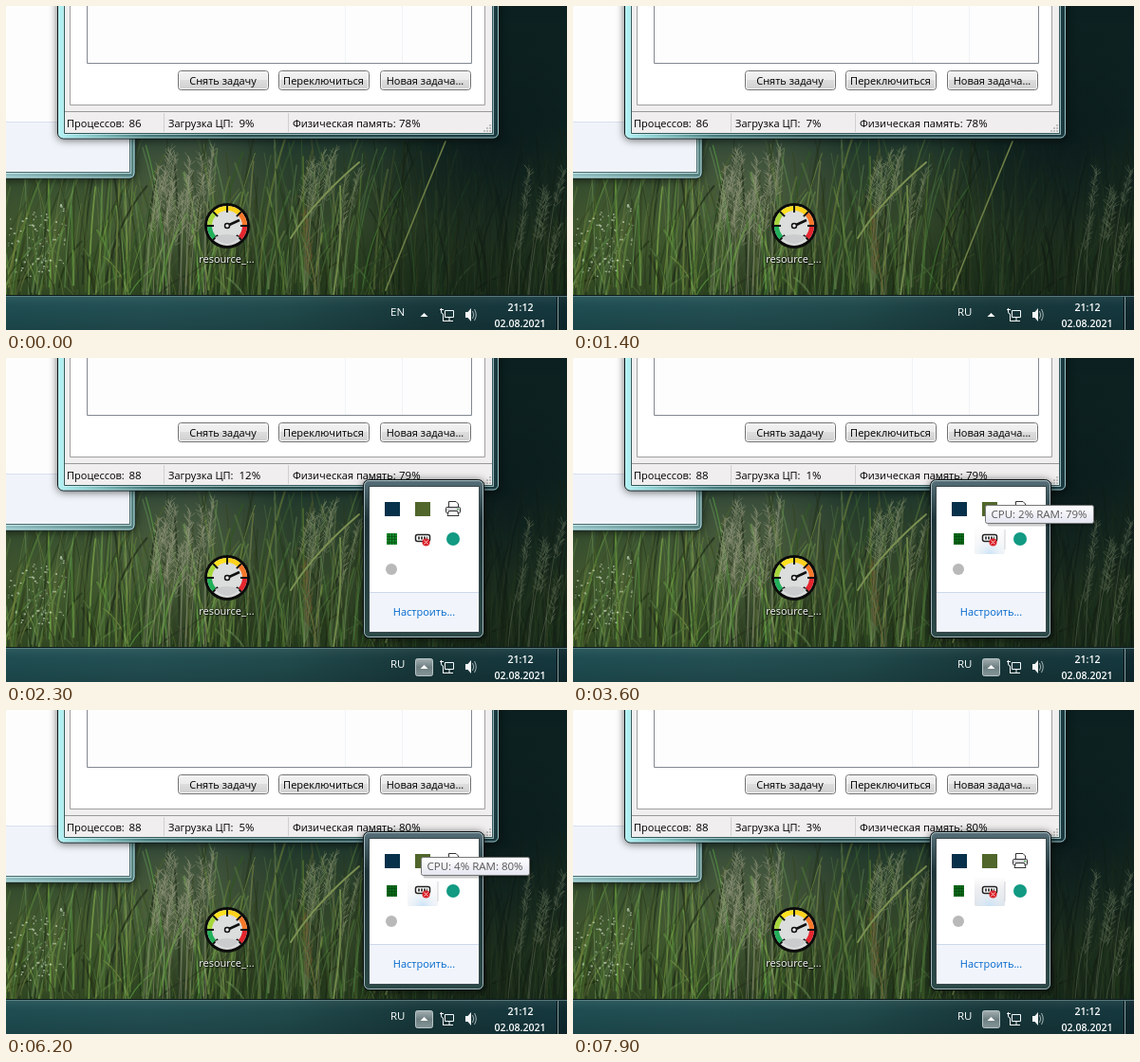
Recreate the animation shown at these times as an HTML page with a canvas. Size 591 px wide and 342 px high, loop 8 s.

```html
<!DOCTYPE html>
<html lang="ru">
<head>
<meta charset="utf-8">
<title>Tray monitor</title>
<style>
html, body { margin: 0; width: 100%; height: 100%; overflow: hidden; background: #0c1b1e; }
canvas, svg { position: absolute; left: 0; top: 0; width: 591px; height: 342px; display: block; }
text { font: 11px "Open Sans", "Noto Sans", sans-serif; }
.mid { text-anchor: middle; }
.value, .tray text, #tipText { font-size: 11.5px; }
.tray text { fill: #fff; }
.tray .clock { font-size: 10.6px; font-weight: 600; }
.label { fill: #fff; text-shadow: 1px 1px 2px #000, 0 0 2px #000; }
.shadow { filter: drop-shadow(0 1px 4px rgba(0, 0, 0, .6)); }
</style>
</head>
<body>
<canvas id="meadow" width="591" height="342"></canvas>
<svg viewBox="0 0 591 342">
  <defs>
    <linearGradient id="glass">
      <stop offset="0" stop-color="#b4f4f6"/><stop offset=".04" stop-color="#9adbdd"/>
      <stop offset=".2" stop-color="#4a7c7c"/><stop offset=".4" stop-color="#2c514f"/>
      <stop offset="1" stop-color="#1b3a40"/>
    </linearGradient>
    <linearGradient id="backGlass">
      <stop offset="0" stop-color="#9fcdd0"/><stop offset="1" stop-color="#55807f"/>
    </linearGradient>
    <linearGradient id="button" x2="0" y2="1">
      <stop offset="0" stop-color="#f3f3f3"/><stop offset=".49" stop-color="#ebebeb"/>
      <stop offset=".5" stop-color="#dddddd"/><stop offset="1" stop-color="#cfcfcf"/>
    </linearGradient>
    <linearGradient id="bar">
      <stop offset="0" stop-color="#1f5054"/><stop offset=".25" stop-color="#245256"/>
      <stop offset=".5" stop-color="#224d4f"/><stop offset=".75" stop-color="#18393c"/>
      <stop offset="1" stop-color="#153a41"/>
    </linearGradient>
    <linearGradient id="barShade" x2="0" y2="1">
      <stop offset="0" stop-color="#fff" stop-opacity=".08"/><stop offset=".35" stop-color="#000" stop-opacity=".04"/>
      <stop offset="1" stop-color="#000" stop-opacity=".16"/>
    </linearGradient>
    <linearGradient id="popupGlass" x2="0" y2="1">
      <stop offset="0" stop-color="#57707a"/><stop offset=".25" stop-color="#1e3338"/>
      <stop offset="1" stop-color="#2c4a48"/>
    </linearGradient>
    <linearGradient id="tipFill" x2="0" y2="1">
      <stop offset="0" stop-color="#fff"/><stop offset="1" stop-color="#e4e5f0"/>
    </linearGradient>
    <linearGradient id="cellFill" x2="0" y2="1">
      <stop offset="0" stop-color="#fff"/><stop offset=".45" stop-color="#ecedf0"/>
      <stop offset="1" stop-color="#d7dbe2"/>
    </linearGradient>
    <radialGradient id="cellGlow" cy="1" r=".7">
      <stop offset="0" stop-color="#c9e2f6"/><stop offset="1" stop-color="#fff" stop-opacity="0"/>
    </radialGradient>
    <linearGradient id="arrowFill" x2="0" y2="1">
      <stop offset="0" stop-color="#a3b0b2"/><stop offset=".5" stop-color="#6e7f82"/>
      <stop offset="1" stop-color="#859699"/>
    </linearGradient>
  </defs>

  <g class="shadow">
    <rect x="-20" y="-20" width="156" height="202" rx="6" fill="url(#backGlass)" stroke="#16282b"/>
    <path d="M0 181H130Q135 181 135 176V0" fill="none" stroke="#c9f1f2" stroke-opacity=".85"/>
  </g>
  <path d="M0 176.500H131.500V0" fill="none" stroke="#d5f3f4" stroke-opacity=".7"/>
  <path d="M-2 -2H130.500V175.500H-2Z" fill="#f0f4fa" stroke="#48696c"/>
  <path d="M0 0H130V122H0Z" fill="#fdfdfd"/>
  <path d="M0 122.500H130" stroke="#d9e2ee"/>

  <g class="shadow">
    <rect x="54.500" y="-20" width="465" height="160" rx="6" fill="url(#glass)" stroke="#0b1719"/>
    <rect x="55.500" y="-20" width="463" height="159" rx="5" fill="none" stroke="#c5f1f3" stroke-opacity=".75"/>
  </g>
  <path d="M60.500 -2V135.500H513.500V-2" fill="none" stroke="#d5f3f4" stroke-opacity=".65"/>
  <path d="M61.500 -2V134.500H512.500V-2Z" fill="#f0eeee" stroke="#35595c"/>
  <path d="M67.500 -2V104.500H504.500V-2Z" fill="#fff" stroke="#a0a0a0"/>
  <path d="M85.500 -2V60.500H490.500V-2Z" fill="#fdfdfd" stroke="#828790"/>
  <path d="M357.500 0V60M417.500 0V60" stroke="#f0f3f6"/>
  <g id="buttons"></g>
  <path d="M62 111.500H512" stroke="#989898"/>
  <path d="M166.500 113V133M297.500 113V133" stroke="#d0d0d0"/>
  <path d="M510 125V133M507 128V133M504 131V133" stroke="#c0c0c0" stroke-width="2" stroke-dasharray="2 1"/>
  <text x="64" y="128">Процессов:</text><text class="value" x="129.500" y="128" id="processes"></text>
  <text x="171" y="128">Загрузка ЦП:</text><text class="value" x="245.500" y="128" id="cpu"></text>
  <text x="302" y="128">Физическая память:</text><text class="value" x="414" y="128" id="memory"></text>

  <g id="selection">
    <rect x="195.500" y="206.500" width="75" height="69" rx="3" fill="#b9dff2" fill-opacity=".25" stroke="#d5effb" stroke-opacity=".55"/>
  </g>
  <g transform="translate(233 232)">
    <circle r="22.500" fill="#dcdddd" stroke="#0b0b0b" stroke-width="3"/>
    <g id="gauge"></g>
    <path d="M-13 12Q0 6 13 12Q7 19 0 19T-13 12Z" fill="#cbcccd"/>
    <path d="M0 0L13 -6" stroke="#111" stroke-width="2.500"/>
    <circle r="2.500" fill="#eee" stroke="#111" stroke-width="1.500"/>
  </g>
  <text class="mid label" x="232.500" y="271">resource_...</text>

  <path d="M0 305H591V342H0Z" fill="url(#bar)"/>
  <path d="M0 305H591V342H0Z" fill="url(#barShade)"/>
  <path d="M0 305.500H591" stroke="#0b1a1c"/>
  <path d="M0 306.500H591" stroke="#7c9b9c" stroke-opacity=".6"/>
  <path d="M582 307H591V342H582Z" fill="#000" fill-opacity=".25"/>
  <path d="M580.500 307V342" stroke="#071113"/>
  <path d="M581.500 307V342" stroke="#a5bcc0" stroke-opacity=".8"/>
  <g class="tray">
    <text x="405" y="327" id="language"></text>
    <rect id="arrow" x="431.500" y="317.500" width="18" height="18" rx="2" fill="url(#arrowFill)" stroke="#b8c5c7"/>
    <path d="M436.500 328L440.500 324L444.500 328Z" fill="#fff"/>
    <g fill="none" stroke="#f4f7f7">
      <path d="M462.500 321.500H471.500V328.500H462.500ZM467 329V332M463 332.500H471M458.500 319V323Q458.500 325 460.500 325V333M457 320.500H461M460 332.500H463"/>
      <path d="M491.500 322Q494 326 491.500 330M493.500 320Q497 326 493.500 332" stroke-opacity=".65"/>
    </g>
    <path d="M484 323H486.500L490 319V333L486.500 329H484Z" fill="#f4f7f7"/>
    <text class="mid clock" x="542" y="322">21:12</text>
    <text class="mid clock" x="541.500" y="339">02.08.2021</text>
  </g>

  <g id="popup">
    <g class="shadow">
      <rect x="376.500" y="128.500" width="127" height="167" rx="6" fill="url(#popupGlass)" stroke="#081012"/>
      <rect x="377.500" y="129.500" width="125" height="165" rx="5" fill="none" stroke="#c9dcdf" stroke-opacity=".75"/>
    </g>
    <rect x="382.500" y="135.500" width="116" height="154" fill="#fff" stroke="#39494c"/>
    <path d="M383 248H498V289H383Z" fill="#f1f5fb"/>
    <path d="M383 247.500H498" stroke="#ccd9ea"/>
    <text class="mid" x="440.500" y="272" fill="#0066cc">Настроить...</text>
    <g id="hover">
      <rect id="cell" x="423" y="176" width="32" height="31" rx="2" fill="url(#cellFill)"/>
      <rect x="423" y="176" width="32" height="31" fill="url(#cellGlow)"/>
      <path d="M455 181V202" stroke="#c4c8ce" stroke-opacity=".8"/>
    </g>
    <rect x="399" y="152" width="16" height="15" fill="#07314a"/>
    <rect x="431" y="152" width="16" height="15" fill="#50662b"/>
    <path d="M466.500 157V151.500H474L476.500 154V157" fill="#fff" stroke="#333"/>
    <rect x="463.500" y="157.500" width="15" height="6" rx="1" fill="#d7d9dc" stroke="#333"/>
    <path d="M466.500 161.500H475.500L477 166.500H465Z" fill="#fff" stroke="#333"/>
    <path d="M475 159.500H477" stroke="#3a9d3a"/>
    <rect id="chip" x="401" y="185" width="11" height="12"/>
    <path d="M401 188.500H412M401 191.500H412M401 194.500H412M403.500 185V197M406.500 185V197M409.500 185V197" stroke="#04420c" stroke-opacity=".55"/>
    <rect x="431.500" y="186.500" width="15" height="7" rx="2" fill="#fff" stroke="#222" stroke-width="1.500"/>
    <path d="M434 190H444" stroke="#444" stroke-width="3" stroke-dasharray="2 1"/>
    <circle cx="442.500" cy="194.500" r="4" fill="#d9242c"/>
    <path d="M440.500 192.500L444.500 196.500M444.500 192.500L440.500 196.500" stroke="#fbd0d0"/>
    <circle cx="471" cy="191" r="7" fill="#129a83"/>
    <circle cx="406" cy="223" r="6" fill="#b9b9b9"/>
  </g>

  <g id="tip">
    <rect x="2.500" y="2.500" width="115" height="20" rx="2" fill="#000" fill-opacity=".2"/>
    <rect x=".5" y=".5" width="114" height="19" rx="2" fill="url(#tipFill)" stroke="#767676"/>
    <text x="6.500" y="13.500" fill="#575757" id="tipText"></text>
  </g>
</svg>
<script>
const LOOP = 8000, TICK = 100;
const $ = id => document.getElementById(id);

function seeded(seed) {
  return () => (seed = (seed * 16807) % 2147483647) / 2147483647;
}

function drawMeadow() {
  const ctx = $('meadow').getContext('2d'), rnd = seeded(4217);
  const between = (a, b) => a + (b - a) * rnd();
  const fillAll = gradient => { ctx.fillStyle = gradient; ctx.fillRect(0, 0, 591, 342); };
  const withStops = (gradient, stops) => {
    stops.forEach(([at, color]) => gradient.addColorStop(at, color));
    return gradient;
  };
  const glow = (x, y, r, rgb, alpha) => fillAll(withStops(
    ctx.createRadialGradient(x, y, 0, x, y, r), [[0, `rgba(${rgb},${alpha})`], [1, `rgba(${rgb},0)`]]));
  const blade = (x, base, bendX, bendY, tipX, tipY, color, width) => {
    ctx.strokeStyle = color;
    ctx.lineWidth = width;
    ctx.beginPath();
    ctx.moveTo(x, base);
    ctx.quadraticCurveTo(bendX, bendY, tipX, tipY);
    ctx.stroke();
  };
  const seedHead = (x, y, length, lean, rgb) => {
    blade(x - lean, 310, x - lean * .8, y + length, x, y, `rgba(${rgb},.5)`, 1);
    for (let k = 0; k < length; k += 1.3) {
      const cx = x - lean * .4 * k / length, side = rnd() < .5 ? -1 : 1;
      blade(cx, y + k, cx + side, y + k, cx + side * between(1, 6), y + k - between(2, 7),
        `rgba(${rgb},${between(.25, .6)})`, 1);
    }
  };

  fillAll(withStops(ctx.createLinearGradient(0, 0, 0, 306),
    [[0, '#0e272c'], [.4, '#15302f'], [.52, '#263c2c'], [.75, '#33472a'], [1, '#22371a']]));
  glow(60, 240, 150, '95,125,60', .4);
  glow(190, 190, 110, '110,125,90', .45);

  ctx.lineCap = 'round';
  for (let i = 0; i < 640; i++) {
    const x = between(-20, 610), height = between(25, 175), lean = between(-28, 45);
    const base = between(290, 325), shade = 1 - Math.max(0, x - 180) / 1000;
    blade(x, base, x + lean * .2, base - height * .6, x + lean, base - height,
      `hsla(${between(74, 108)},${between(22, 45)}%,${between(11, 52) * shade}%,${between(.3, .7)})`,
      between(.6, 2.2));
  }

  for (let i = 0; i < 14; i++) {
    seedHead(between(160, 222), between(148, 205), between(40, 65), between(-10, 20), '148,152,125');
  }
  for (let i = 0; i < 8; i++) {
    seedHead(between(320, 385), between(145, 180), between(35, 60), between(8, 24), '122,136,100');
  }

  // The meadow fades into shade towards the right.
  fillAll(withStops(ctx.createLinearGradient(360, 0, 591, 0),
    [[0, 'rgba(9,24,20,0)'], [.4, 'rgba(9,24,20,.5)'], [1, 'rgba(9,24,20,.5)']]));
  glow(520, 140, 120, '9,26,27', .85);

  for (let i = 0; i < 6; i++) {
    seedHead(between(535, 590), between(170, 235), between(35, 55), between(10, 24), '92,106,82');
  }
  seedHead(315, 215, 70, -12, '118,88,48');
  blade(400, 300, 425, 235, 463, 143, '#6d7f46', 1.6);
  blade(300, 245, 325, 205, 372, 165, '#7c9152', 2);
  blade(345, 305, 355, 250, 352, 190, '#71894a', 1.8);

  for (let i = 0; i < 90; i++) {
    ctx.fillStyle = `rgba(215,228,205,${between(.3, .8)})`;
    ctx.fillRect(between(2, 62), between(208, 285), between(1, 2.5), between(1, 2));
  }
}

function drawButtons() {
  $('buttons').innerHTML = [[181, 'Снять задачу'], [287, 'Переключиться'], [394, 'Новая задача...']]
    .map(([x, label]) => `
      <rect x="${x + .5}" y="68.500" width="95" height="20" rx="3" fill="url(#button)" stroke="#707070"/>
      <rect x="${x + 1.5}" y="69.500" width="93" height="18" rx="2" fill="none" stroke="#fcfcfc" stroke-opacity=".8"/>
      <text class="mid" x="${x + 47.5}" y="83">${label}</text>`).join('');
}

function drawGauge() {
  const point = (r, deg) => {
    const a = deg * Math.PI / 180;
    return `${r * Math.cos(a)} ${r * Math.sin(a)}`;
  };
  const colors = ['#22b05a', '#a7d63c', '#ffe11f', '#ffd21c', '#f6782a', '#e5262e'];
  const from = 135, step = 45;
  let marks = colors.map((color, i) =>
    `<path d="M${point(18.5, from + i * step)}A18.5 18.5 0 0 1 ${point(18.5, from + (i + 1) * step)}" fill="none" stroke="${color}" stroke-width="5"/>`).join('');
  for (let i = 0; i <= colors.length; i++) {
    const deg = from + i * step;
    marks += `<path d="M${point(14, deg)}L${point(21, deg)}" stroke="#111" stroke-width="2"/>`;
  }
  $('gauge').innerHTML = marks;
}

// Latest value whose start time has passed.
const at = (t, steps) => steps.filter(([start]) => start <= t).pop()[1];
// Fade whose first visible step is at start and which is complete at end.
const fade = (t, start, end) => Math.min(1, Math.max(0, (t - start + TICK) / (end - start + TICK)));
const show = (id, opacity) => $(id).setAttribute('opacity', opacity);
const write = (id, value) => { if ($(id).textContent !== value) $(id).textContent = value; };

function render(now) {
  const t = Math.floor((now % LOOP) / TICK) * TICK;
  write('processes', at(t, [[0, '86'], [1500, '88']]));
  write('cpu', at(t, [[0, '9%'], [600, '7%'], [1500, '12%'], [2500, '4%'], [3400, '1%'],
    [5300, '3%'], [6200, '5%'], [7100, '3%']]));
  write('memory', at(t, [[0, '78%'], [1500, '79%'], [4300, '80%']]));
  write('language', at(t, [[0, 'EN'], [900, 'RU']]));

  show('selection', t >= 400 ? 1 - fade(t, 800, 1100) : 0);
  show('arrow', fade(t, 1500, 1600));
  show('popup', fade(t, 1900, 2300));
  show('hover', fade(t, 2900, 3000) - fade(t, 4500, 4800) + fade(t, 5700, 5800));
  show('cell', t < 7900 ? .35 : 1);
  $('chip').setAttribute('fill', t < 2500 ? '#14882a' : '#0b6b1c');

  const second = t >= 5000;
  show('tip', fade(t, 3400, 3600) - fade(t, 4500, 4800) + fade(t, 5800, 6000) - fade(t, 7600, 7700));
  $('tip').setAttribute('transform', `translate(${second ? 437 : 434} 155)`);
  write('tipText', second ? 'CPU: 4% RAM: 80%' : 'CPU: 2% RAM: 79%');
}

drawMeadow();
drawButtons();
drawGauge();
const began = performance.now();
function frame() {
  render(performance.now() - began);
  requestAnimationFrame(frame);
}
frame();
</script>
</body>
</html>
```
